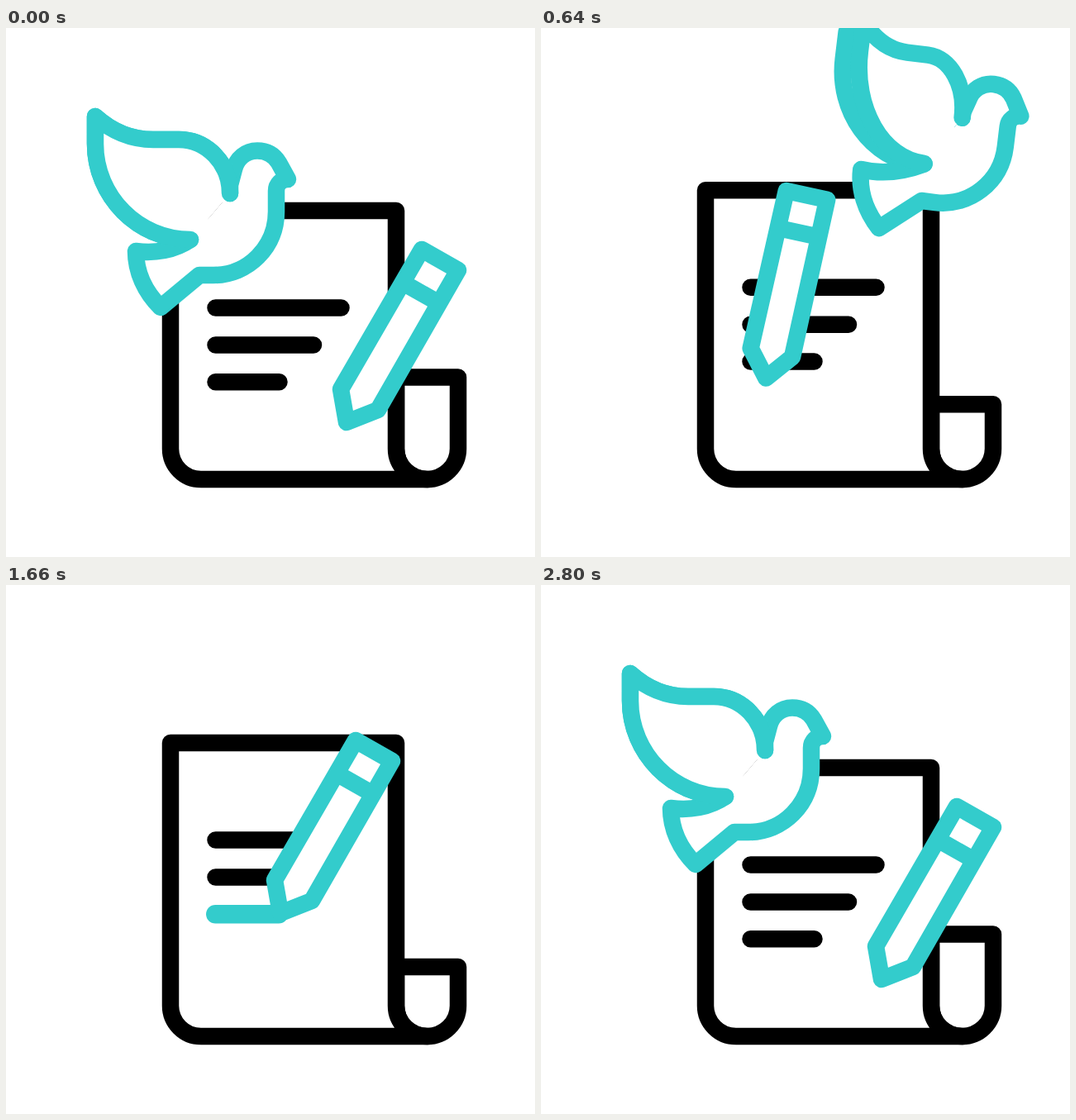
Recreate the animation shown at these times as an HTML page. Size 640 px wide and 640 px high, loop 2.82 s.

```html
<!DOCTYPE html>
<html lang="en">
<head>
<meta charset="utf-8">
<title>Dove and treaty</title>
<style>
  html, body { margin: 0; height: 100%; overflow: hidden; background: #fff; }
  svg { display: block; width: 100vw; height: 100vh; }
  path { fill: #fff; stroke: #000; stroke-width: 20.5; stroke-linecap: round; stroke-linejoin: round; }
  .teal path, path.teal { stroke: #3cc; }
  #ink { stroke-width: 22.5; }
</style>
</head>
<body>
<svg viewBox="0 0 640 640">
  <path id="curl"/>
  <path id="paper"/>
  <g id="lines">
    <path d="M253.5 338.5H405.5M253.5 383.5H372M253.5 428.3H330.5"/>
    <path id="ink" class="teal"/>
  </g>
  <g id="bird" class="teal">
    <path id="back"/>
    <path id="body"/>
    <path id="front"/>
  </g>
  <g id="pencil" class="teal">
    <path d="M503 268L547 293L450 462L412 477L405 437ZM480 308L524 333"/>
  </g>
</svg>
<script>
const LOOP = 2820;
const $ = id => document.getElementById(id);
const set = (id, name, value) => $(id).setAttribute(name, value);

// Eased progress from 0 to 1 between two times
const ease = (t, from, to) => {
  const u = Math.min(1, Math.max(0, (t - from) / (to - from)));
  return u * u * (3 - 2 * u);
};

const WING = 'M271 200C271 164 243 135 209 135H178C152 135 129 126 108 107V140C108 204 160 256 223 256';
set('back', 'd', WING);
set('front', 'd', WING);

// Shift by (x, y) and turn around a pivot that belongs to the shape
const place = (id, x, y, angle, px, py) =>
  set(id, 'transform', `translate(${x} ${y}) rotate(${angle} ${px} ${py})`);

const scaleWing = (id, sx, sy) =>
  set(id, 'd', WING.replace(/([MCHV])([^MCHV]*)/g, (_, cmd, args) => {
    const flip = cmd === 'V' ? 1 : 0;
    return cmd + args.trim().split(' ').map((n, i) =>
      (i + flip) % 2 ? 282 + (n - 282) * sy : 271 + (n - 271) * sx).join(' ');
  }));

function drawPaper(t) {
  const e = ease(t, 200, 800) - ease(t, 1800, 2400);
  const top = 221 - 30 * e, fold = 422.5 + 39.5 * e;
  set('paper', 'd', `M510 546H236A37 37 0 0 1 199 509V${top}H472V509A37.5 37 0 0 0 510 546`);
  set('curl', 'd', `M472 ${fold}H547V509A37.5 37 0 0 1 472 509Z`);
  set('lines', 'transform', `translate(0 ${-30 * e})`);
}

function drawPencil(t) {
  const a = ease(t, 200, 800), b = ease(t, 1000, 1660), c = ease(t, 1800, 2400);
  const x = -a * (198 - 35 * a) + 83 * b + 80 * c;
  const y = -a * (5.7 + 71.3 * a) - 3 * b + 80 * c;
  place('pencil', x, y, 21 * (b - a), 412, 477);
  set('ink', 'd', `M253.3 428.3H${253.3 + 76.7 * b}`);
  set('ink', 'opacity', t < 1000 ? 0 : 1 - ease(t, 2400, 2780));
}

function drawBird(t) {
  const leaving = t < 1800;
  const s = leaving ? ease(t, 0, 1540) : 0;
  if (leaving) {
    const x = s * (620.6 - 38 * s - 109.5 * s * s);
    const y = s * (-149.6 - 302 * s + 55 * s * s);
    place('bird', x, y, 18.3 * s, 187, 338);
  } else {
    const r = 1 - ease(t, 2080, 2800);
    place('bird', -418 * r, -31 * r, 30 * r, 187, 338);
  }
  scaleWing('back', 1 - 0.19 * s, 1);
  scaleWing('front', 1 - 0.5 * s, 1 + 0.22 * s);
  const neck = 17 * s;
  set('body', 'd', `M${223 + 24 * s} ${256 - 4 * s}C204 269 180 273 157 270C157 295 168 319 187 338
    L234 299H251C293 299 327 265 327 222V197C327 189 333 183 341 183L330 163
    C324 153 315 148.5 304 148.5C290 148.5 279 158 276 171L271 ${190 - neck / 2}V${200 - neck}`);
}

function frame(now) {
  const t = now % LOOP;
  drawPaper(t);
  drawPencil(t);
  drawBird(t);
  requestAnimationFrame(frame);
}
frame(0);
</script>
</body>
</html>
```
